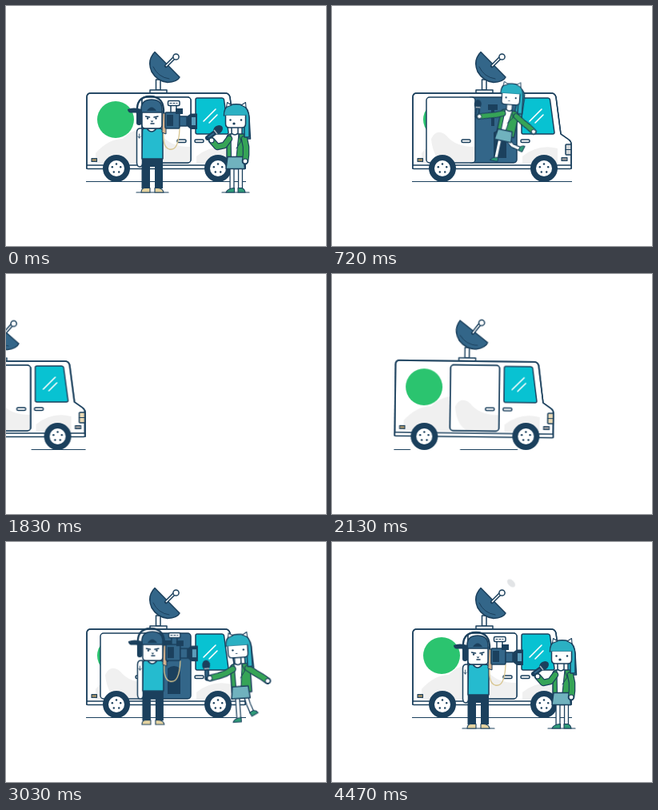
Animation, 400 px wide and 300 px high, one loop 4.5 s. Source, as an HTML page:

```html
<!DOCTYPE html>
<html lang="en">
<head>
<meta charset="utf-8">
<title>News van</title>
<style>
html, body { margin: 0; width: 100%; height: 100%; overflow: hidden; background: #fff; }
svg { display: block; width: 100%; height: 100%; }
:root { --navy: #1b405d; --blue: #336689; --teal: #08c2d2; --green: #36a457; --hair: #2bb0c3; }

.ln { fill: none; stroke: var(--navy); stroke-width: 1.5; stroke-linecap: round; stroke-linejoin: round; }
.box { fill: #fff; stroke: var(--navy); stroke-width: 1.5; stroke-linejoin: round; }
.thin { stroke-width: 1.1; }
.navy { fill: var(--navy); }
.blue { fill: var(--blue); }
.teal { fill: var(--teal); }
.hair { fill: var(--hair); }
.green { fill: var(--green); }
.shoe { fill: #2f9b78; }
.grey { fill: #f0f0f0; }
.limb { fill: none; stroke-linecap: round; stroke-linejoin: round; stroke: var(--green); stroke-width: 6.2; }
.limb.edge { stroke: var(--navy); stroke-width: 8.6; }
.limb.skin { stroke: #fff; stroke-width: 3.6; }
.limb.skin.edge { stroke: var(--navy); stroke-width: 6.2; }
.limb.tip { marker-end: url(#hand); }

.a { animation: 4.5s linear infinite; }
.soft { animation-timing-function: ease-in-out; }
.cut { animation-timing-function: step-end; }

/* Van */
.drive { animation-name: drive; }
@keyframes drive {
  0%, 21% { transform: translateX(0); }
  24.3% { transform: translateX(-10px); animation-timing-function: ease-in; }
  26% { transform: translateX(14px); }
  34% { transform: translateX(325px); }
  34.01% { transform: translateX(-330px); }
  36.7% { transform: translateX(-303px); }
  40.67% { transform: translateX(-201px); }
  46% { transform: translateX(-45px); }
  48% { transform: translateX(-12px); }
  50% { transform: translateX(-1px); }
  51.5% { transform: translateX(2px); }
  54%, 100% { transform: translateX(0); }
}
.tilt { animation-name: tilt; transform-origin: 201px 203px; }
@keyframes tilt {
  0%, 21% { transform: translateY(0) rotate(0); }
  24% { transform: translateY(1px) rotate(.5deg); }
  26% { transform: translateY(2px) rotate(-1.5deg); }
  32% { transform: translateY(0) rotate(-.8deg); }
  36%, 45% { transform: translateY(0) rotate(0); }
  49% { transform: translateY(0) rotate(1.2deg); }
  52% { transform: translateY(0) rotate(-.5deg); }
  55%, 100% { transform: translateY(0) rotate(0); }
}
.dish { animation-name: dish; transform-origin: 190px 97px; }
@keyframes dish {
  0%, 21% { transform: rotate(0); }
  24% { transform: rotate(5deg); }
  26% { transform: rotate(3deg); }
  30% { transform: rotate(-10deg); }
  40.67% { transform: rotate(-4deg); }
  47% { transform: rotate(-9deg); }
  52% { transform: rotate(13deg); }
  56% { transform: rotate(9deg); }
  58% { transform: rotate(-5deg); }
  60% { transform: rotate(2deg); }
  62%, 100% { transform: rotate(0); }
}
.spin { animation-name: spin; }
@keyframes spin {
  0%, 24.3% { transform: rotate(0); }
  34% { transform: rotate(1080deg); }
  34.01% { transform: rotate(0); }
  48% { transform: rotate(1050deg); }
  52%, 100% { transform: rotate(1080deg); }
}
.slide { animation-name: slide; }
@keyframes slide {
  0%, 8% { transform: translateX(0); }
  12.5%, 17.3% { transform: translateX(-52px); }
  20.5%, 60.7% { transform: translateX(0); }
  64%, 68% { transform: translateX(-52px); }
  71%, 100% { transform: translateX(0); }
}
.cover { animation-name: cover; }
@keyframes cover { 0% { opacity: 0; } 17.2% { opacity: 1; } 21%, 100% { opacity: 0; } }
.shade { animation-name: shade; }
@keyframes shade { 0% { opacity: 0; } 23.5% { opacity: 1; } 38% { opacity: 0; } 54% { opacity: 1; } 61%, 100% { opacity: 0; } }
.lamp { animation-name: lamp; }
@keyframes lamp { 0% { fill: #d5d8da; } 23.5% { fill: #e2d97c; } 36% { fill: #ead9b4; } 50%, 100% { fill: #d5d8da; } }
.road { animation-name: road; }
@keyframes road {
  0%, 24% { stroke-dasharray: 200 0; stroke-dashoffset: 0; animation-timing-function: step-end; }
  24.01% { stroke-dasharray: 72 62; stroke-dashoffset: -30px; }
  26% { stroke-dasharray: 72 62; stroke-dashoffset: 0; }
  50% { stroke-dasharray: 72 62; stroke-dashoffset: 660px; animation-timing-function: step-end; }
  50.01%, 100% { stroke-dasharray: 200 0; stroke-dashoffset: 0; }
}
.dust { animation-name: dust; transform-origin: 178px 218px; }
@keyframes dust {
  0%, 24.3% { opacity: 0; transform: scale(.3); }
  26% { opacity: 1; transform: scale(1); }
  31% { opacity: 0; transform: translateX(-90px) scale(1.5); }
  100% { opacity: 0; }
}
.wave { animation-name: wave; transform-origin: 224px 52px; }
@keyframes wave {
  0%, 93% { opacity: 0; transform: translate(-9px, 9px) scale(.4); }
  96% { opacity: 1; transform: translate(-3px, 3px) scale(.8); }
  99.3%, 100% { opacity: 1; transform: none; }
}

/* Reporter */
.girl { animation-name: girl; transform-origin: 287px 180px; }
@keyframes girl {
  0%, 9.5% { transform: none; }
  11% { transform: translate(-4px, 4px) rotate(-4deg); }
  16% { transform: translate(-69px, -32px) rotate(12deg) scale(.9); }
  19%, 62% { transform: translate(-82px, -22px) rotate(4deg) scale(.8); }
  65.5% { transform: translate(-24px, -32px) rotate(10deg) scale(.95); }
  68% { transform: translate(10px, -4px) rotate(-6deg); }
  71%, 100% { transform: none; }
}
.girlOn { animation-name: girlOn; }
@keyframes girlOn { 0% { opacity: 1; } 19% { opacity: 0; } 63%, 100% { opacity: 1; } }
.head { animation-name: head; transform-origin: 287px 155px; }
@keyframes head {
  0%, 4%, 8% { transform: none; }
  2%, 6% { transform: rotate(2deg); }
  16% { transform: rotate(-8deg); }
  70%, 78% { transform: none; }
  83%, 88%, 93% { transform: rotate(2deg); }
  85.5%, 90.5%, 96%, 100% { transform: none; }
}
.talk { animation-name: talk; transform-origin: 285px 147px; }
@keyframes talk {
  0%, 4%, 8% { transform: scaleY(1); }
  2%, 6% { transform: scaleY(.3); }
  10%, 81% { transform: scaleY(.3); }
  83%, 87%, 91%, 95%, 99%, 100% { transform: scaleY(1); }
  85%, 89%, 93%, 97% { transform: scaleY(.3); }
}
.armL { d: path("M279 166 L273 174 L264 176 L257 168"); animation-name: armL; }
@keyframes armL {
  0%, 10% { d: path("M279 166 L273 174 L264 176 L257 168"); }
  16%, 66% { d: path("M279 166 L270 170 L260 173 L248 177"); }
  71%, 74% { d: path("M279 166 L273 174 L264 176 L257 168"); }
  76%, 80% { d: path("M279 167 L271 174 L261 174 L257 167"); }
  83%, 100% { d: path("M279 166 L273 174 L264 176 L257 168"); }
}
.armR { d: path("M298 166 L300 176 L300 186 L299 194"); animation-name: armR; }
@keyframes armR {
  0%, 10% { d: path("M298 166 L300 176 L300 186 L299 194"); }
  16%, 66% { d: path("M298 166 L308 172 L318 177 L326 182"); }
  71%, 73.5% { d: path("M298 166 L300 176 L300 186 L299 194"); }
  76%, 78.67% { d: path("M297 168 L296 177 L278 177 L270 159"); }
  77.3%, 80% { d: path("M297 168 L296 177 L280 177 L274 160"); }
  83%, 100% { d: path("M298 166 L300 176 L300 186 L299 194"); }
}
.legR { d: path("M293 200 L293 214 L293 228"); animation-name: legR; }
@keyframes legR {
  0%, 10% { d: path("M293 200 L293 214 L293 228"); }
  16%, 65% { d: path("M293 200 L301 207 L311 209"); }
  69%, 100% { d: path("M293 200 L293 214 L293 228"); }
}
.shoeR { animation-name: shoeR; transform-origin: 293px 229px; }
@keyframes shoeR {
  0%, 10% { transform: none; }
  16%, 65% { transform: translate(20px, -20px) rotate(-75deg); }
  69%, 100% { transform: none; }
}
.mic { animation-name: mic; transform-origin: 256px 165px; }
@keyframes mic {
  0%, 10% { transform: none; }
  16%, 66% { transform: translate(-9px, 9px) rotate(-60deg); }
  71%, 74% { transform: none; }
  76%, 80% { transform: rotate(-20deg); }
  83%, 100% { transform: none; }
}
.girlLine { animation-name: girlLine; }
@keyframes girlLine { 0% { opacity: 1; } 12% { opacity: 0; } 69%, 100% { opacity: 1; } }

/* Camera operator */
.man { animation-name: man; transform-origin: 183px 190px; }
@keyframes man {
  0%, 7% { transform: none; }
  8.5% { transform: translate(-2px, 3px); }
  12%, 63% { transform: translate(20px, -16px) scale(.85); }
  66% { transform: translate(6px, -14px); }
  68.5% { transform: translate(-3px, 2px); }
  70%, 100% { transform: none; }
}
.manOn { animation-name: manOn; }
@keyframes manOn { 0% { opacity: 1; } 12.5% { opacity: 0; } 63.5%, 100% { opacity: 1; } }
.manLine { animation-name: manLine; }
@keyframes manLine { 0% { opacity: 1; } 9% { opacity: 0; } 68%, 100% { opacity: 1; } }
</style>
</head>
<body>
<svg viewBox="0 0 400 300">
  <defs>
    <marker id="hand" markerUnits="userSpaceOnUse" markerWidth="9" markerHeight="9" refX="4.5" refY="4.5">
      <circle class="box thin" cx="4.5" cy="4.5" r="3"/>
    </marker>
    <path id="shell" d="M106 109H274Q279 109 280 114L286 160L296 167Q299 169 299 173V203H101V114Q101 109 106 109Z"/>
    <g id="door">
      <rect class="box" x="170" y="114" width="61" height="82" rx="4"/>
      <path class="grey" d="M176 166Q183 152 195 162Q206 176 230 176V192Q230 195 227 195H190Q178 188 176 166Z"/>
    </g>
    <rect id="grip" class="box" x="214" y="167" width="11" height="3.4" rx="1.5"/>
    <g id="wheel">
      <circle class="navy" r="17"/>
      <circle r="10" fill="#fff"/>
      <g class="a spin navy">
        <circle cy="-5.5" r="1.2"/><circle cx="5.2" cy="-1.7" r="1.2"/><circle cx="3.2" cy="4.5" r="1.2"/>
        <circle cx="-3.2" cy="4.5" r="1.2"/><circle cx="-5.2" cy="-1.7" r="1.2"/>
      </g>
    </g>
  </defs>

  <g class="a dust" fill="#e6e6e6">
    <circle cx="180" cy="213" r="7"/><circle cx="173" cy="216" r="4.5"/>
  </g>

  <g class="a drive">
    <path class="ln a road" d="M100 219.500H300" style="stroke-width:1.2;stroke-linecap:butt"/>
    <g class="a tilt">
      <path class="box" d="M187.500 105V92H193V105Z"/>
      <rect class="box" x="180" y="105" width="21" height="4"/>
      <g class="a dish">
        <path class="box blue" d="M186 57.500L217 89Q214 95 202 95.500Q189 94 182 82Q176 68 186 57.500Z"/>
        <path class="ln" d="M184 76Q190 89 204 91" style="stroke-width:1"/>
        <path class="ln" d="M200 75L210 65" style="stroke-width:4.500"/>
        <path d="M200 75L210 65" stroke="#fff" stroke-width="1.500"/>
        <circle class="box" cx="212.500" cy="63.500" r="3.600"/>
      </g>
      <use href="#shell" class="box"/>
      <path class="grey" d="M112 184Q128 166 146 166Q155 156 170 153V197H112Z"/>
      <path class="grey" d="M238 188Q258 172 282 178V197H238Z"/>
      <use href="#shell" class="grey a cut shade"/>
      <use href="#shell" class="ln"/>
      <rect class="box" x="101" y="199" width="198" height="4.500" rx="1"/>
      <circle cx="137" cy="142" r="23" fill="#2bc46f"/>
      <path class="box teal" d="M239 115H270Q272 115 272.500 117L278 158Q278 160 276 160H239Q237 160 237 158V117Q237 115 239 115Z"/>
      <path d="M247 144L262 129M254 146L264 136" stroke="#fff" stroke-width="1.600" stroke-linecap="round"/>
      <use href="#grip" x="22"/>
      <rect class="box a cut lamp" x="292" y="173" width="7" height="13" rx="1"/>
      <path class="ln" d="M292 179.500H299" style="stroke-width:1"/>
      <rect class="box thin" x="287" y="189.500" width="7" height="4" style="fill:#8b9096"/>
      <rect class="box thin" x="107" y="190.500" width="6.500" height="4" style="fill:#9a8b68"/>

      <rect class="box blue" x="170" y="114" width="61" height="82" rx="4"/>
      <path class="navy" d="M195 123H207V130H203V150H199V130H195ZM202 158Q210 152 218 158V190H202Z"/>
      <g class="a soft slide">
        <use href="#door"/>
        <rect class="grey a cut shade" x="171" y="115" width="59" height="80" rx="3"/>
        <use href="#grip"/>
      </g>
    </g>
    <use href="#wheel" x="138" y="203"/>
    <use href="#wheel" x="265" y="203"/>
  </g>

  <g class="a wave"><ellipse cx="224" cy="51.500" rx="6" ry="3.800" transform="rotate(45 224 51.500)" fill="#e2e4e6"/></g>

  <path class="ln a cut manLine" d="M163 233H203" style="stroke-width:1.2"/>
  <g class="a cut manOn"><g class="a soft man">
    <g transform="translate(-1)">
      <path class="navy" d="M170.500 190H197V228H187V201H181V228H170.500Z"/>
      <path class="box thin" d="M170 233Q170 227.500 175 227.500H181V233ZM187 233V227.500H191Q197 228 198 233Z" style="fill:#e5d3a0"/>
      <path class="box" d="M171 153H169Q164.500 153 164.500 158V196Q165 201 168 201Q171.500 201 171.500 196Z"/>
      <path class="ln" d="M167.500 160V165M165.900 163Q167.500 167 169.300 163" style="stroke-width:.8"/>
      <path class="box" d="M171.500 156Q171.500 153 174 153H193Q197 153 197 157V191H171Z" style="fill:#25bbcf"/>
      <path class="box" d="M177 153Q183 161 189 153Z"/>
      <path class="box" d="M171 131H196V149Q196 153 192 153H175Q171 153 171 149Z"/>
      <path class="box blue" d="M170 133V127Q171 117 183 117Q195 117 196 127V133Z"/>
      <path class="navy" d="M153 129Q160 126 171 129V133.500H156Q153 132 153 129ZM177 131Q183 122 189 131Z"/>
      <path class="ln" d="M165 134Q163 113 181 113Q199 113 198 134" style="stroke-width:2.400"/>
      <rect class="navy" x="164" y="132" width="6.500" height="17" rx="3"/>
      <path class="ln" d="M175.500 138L180.500 139M186 139L191 138M182 147H186"/>
      <g class="navy">
        <circle cx="178" cy="140.500" r="1.200"/><circle cx="188.500" cy="140.500" r="1.200"/>
        <path d="M181.500 143.500H185.500L183.500 145.500Z"/>
      </g>
    </g>
    <path d="M198 150Q194 176 204 179Q216 182 217 153" fill="none" stroke="#d8c58f" stroke-width="1.300"/>
    <path class="box" d="M195 158L200 160V134H196Z" style="fill:#d9b48f;stroke-width:1"/>
    <path class="ln" d="M206 134V125M213 134V125"/>
    <rect class="box" x="202.500" y="118.500" width="14.500" height="6" rx="1.500"/>
    <path class="ln" d="M205 121.500H214" style="stroke-width:1;stroke-dasharray:2 2"/>
    <rect class="box blue" x="199" y="133" width="18" height="20" rx="1.500"/>
    <path class="navy" d="M201 136H209V150H201ZM212 128H221V135H212Z"/>
    <rect class="box blue" x="217" y="138" width="9" height="12"/>
    <path class="navy" d="M226 138L231 134.500H239V154H231L226 150Z"/>
    <rect x="232" y="139" width="5" height="10" fill="#5c9dbb"/>
  </g></g>

  <path class="ln a cut girlLine" d="M270 233H304" style="stroke-width:1.2"/>
  <g class="a cut girlOn"><g class="a soft girl">
    <path class="box hair" d="M295 128Q303 128 304 140L305.500 166H295Z"/>
    <path class="limb skin edge" d="M282.500 200V228"/><path class="limb skin" d="M282.500 200V228"/>
    <path class="limb skin edge a soft legR"/><path class="limb skin a soft legR"/>
    <path class="box shoe thin" d="M275 233Q277 228 285.500 227.500V233Z"/>
    <path class="box shoe thin a soft shoeR" d="M290 233V227.500H295Q298.500 229 299 233Z"/>
    <path class="box green" d="M276 164Q277 160 281 160H296Q301 160 301 166V196H276Z"/>
    <path class="box thin" d="M281 160H291L288 189H281.500Z"/>
    <path class="ln" d="M291 161L294 169L288 178" style="stroke-width:1"/>
    <path class="box" d="M277 188.500H297L298.500 203.500H275Z" style="fill:#70b2be"/>
    <path class="limb edge a soft armR"/><path class="limb tip a soft armR"/>
    <g class="a soft head">
      <path class="box" d="M282 151H290V159Q286 163 282 159Z"/>
      <path class="box hair" d="M272.500 137Q272.500 126 279 124Q288 121.500 296 124Q303.500 128 304 140V164H298V136H272.500Z"/>
      <path class="box" d="M274.500 136H299.500V147Q299.500 152 295 152H279Q274.500 152 274.500 147Z"/>
      <path class="hair" d="M273 136Q274 126 284 125Q298 125 300 136.500H273Z"/>
      <path class="box thin" d="M275.500 126.500L276.500 120.500L282 124ZM294 124L299.500 120.500L300 127Z"/>
      <circle class="navy" cx="280.500" cy="142.500" r="1.200"/><circle class="navy" cx="294" cy="142.500" r="1.200"/>
      <ellipse class="navy a soft talk" cx="285" cy="147" rx="1.700" ry="1.600"/>
    </g>
    <g class="a soft mic">
      <path class="ln" d="M252 165L262 157.500" style="stroke-width:6"/>
      <path d="M253 164L260 159" stroke="#336689" stroke-width="2"/>
      <ellipse class="navy" cx="265" cy="154.500" rx="6.500" ry="5" transform="rotate(-38 265 154.500)"/>
      <path d="M260 155L264 160" stroke="#aeb9c2" stroke-width="1.500"/>
    </g>
    <path class="limb edge a soft armL"/><path class="limb tip a soft armL"/>
  </g></g>

  <g class="a cut cover"><g class="a drive"><g class="a soft slide">
    <use href="#door"/><use href="#grip"/>
  </g></g></g>
</svg>
</body>
</html>
```
